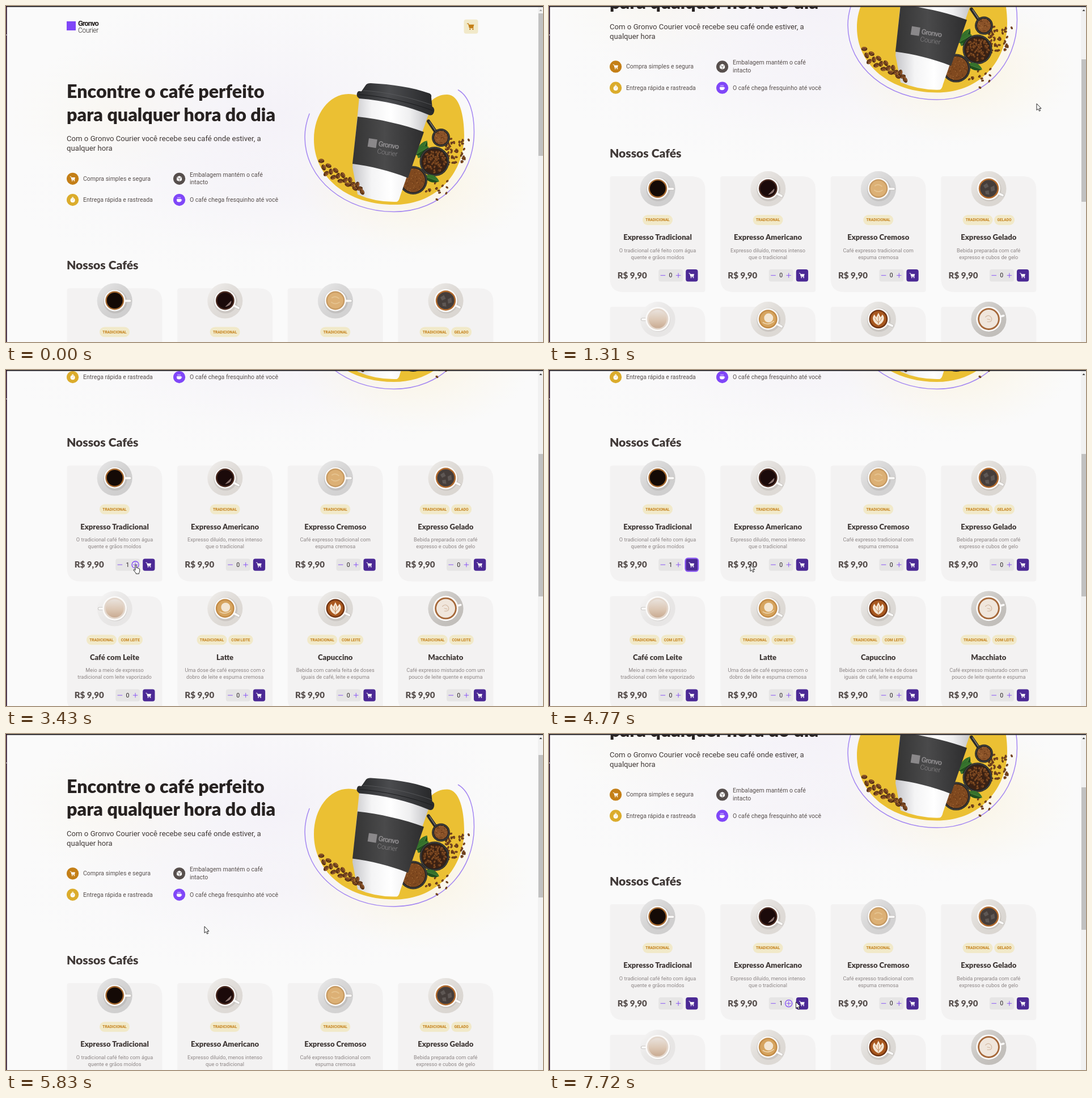
These frames come from a looping animation (947x592 px, 7.99 s). An HTML page:

```html
<!DOCTYPE html>
<html lang="pt-BR">
<head>
<meta charset="utf-8">
<title>Loja de cafés</title>
<style>
html, body { margin: 0; width: 100%; height: 100%; overflow: hidden; background: #fafafa; }
svg { display: block; width: 947px; height: 592px; font-family: Roboto, sans-serif; }
.head { font-family: Lato, sans-serif; font-weight: 900; }
.mid { text-anchor: middle; }
.h1 { font-size: 32.2px; fill: #272221; }
.h2 { font-size: 21.1px; fill: #403937; }
.lead { font-size: 13.16px; fill: #403937; }
.item { font-size: 10.53px; fill: #574f4d; }
.name { font-size: 13.1px; fill: #403937; }
.desc { font-size: 9.21px; fill: #8d8686; }
.price { font-size: 15.1px; fill: #574f4d; }
.count { font-size: 10.53px; fill: #272221; }
.tag { font-size: 6.58px; font-weight: 700; fill: #c47f17; }
.badge { font-size: 8px; fill: #fff; }
.brand { font-size: 13px; font-weight: 700; letter-spacing: -1px; }
.sub { font-size: 12px; font-weight: 300; letter-spacing: -.3px; }
</style>
</head>
<body>
<svg id="stage" viewBox="0 0 947 592"></svg>
<script>
const text = (x, y, str, cls, extra = '') => `<text x="${x}" y="${y}" class="${cls}" ${extra}>${str}</text>`;
const rect = (x, y, w, h, fill, r = 0) => `<rect x="${x}" y="${y}" width="${w}" height="${h}" rx="${r}" fill="${fill}"/>`;
const circle = (x, y, r, fill, extra = '') => `<circle cx="${x}" cy="${y}" r="${r}" fill="${fill}" ${extra}/>`;
const path = (d, fill, extra = '') => `<path d="${d}" fill="${fill}" ${extra}/>`;
const line = (d, color, width) => path(d, 'none', `stroke="${color}" stroke-width="${width}" stroke-linecap="round"`);
const at = (x, y, body, more = '') => `<g transform="translate(${x} ${y}) ${more}">${body}</g>`;

let seed = 7;
const random = () => (seed = seed * 16807 % 2147483647) / 2147483647;

const defs = `<defs>
  <radialGradient id="lilac"><stop offset="0" stop-color="#ece6f5" stop-opacity=".42"/><stop offset="1" stop-color="#f1edf8" stop-opacity="0"/></radialGradient>
  <radialGradient id="cream"><stop offset="0" stop-color="#fbf0d0" stop-opacity=".6"/><stop offset="1" stop-color="#fdf6de" stop-opacity="0"/></radialGradient>
  <linearGradient id="paper"><stop offset="0" stop-color="#c6c6ca"/><stop offset=".25" stop-color="#f4f4f5"/><stop offset=".5" stop-color="#fff"/><stop offset=".75" stop-color="#efeff0"/><stop offset="1" stop-color="#c2c2c5"/></linearGradient>
  <linearGradient id="sleeve"><stop offset="0" stop-color="#343434"/><stop offset=".45" stop-color="#4a4a4b"/><stop offset="1" stop-color="#2d2d2e"/></linearGradient>
  <linearGradient id="lid"><stop offset="0" stop-color="#2a2b2d"/><stop offset=".4" stop-color="#4b4c4f"/><stop offset="1" stop-color="#27282a"/></linearGradient>
  <linearGradient id="china" x2="1" y2="1"><stop offset="0" stop-color="#fff" stop-opacity=".5"/><stop offset="1" stop-color="#8d8884" stop-opacity=".12"/></linearGradient>
  <linearGradient id="milk" x2="0" y2="1"><stop offset="0" stop-color="#e9e2dc"/><stop offset=".55" stop-color="#dcc7b4"/><stop offset="1" stop-color="#c9ab92"/></linearGradient>
</defs>`;

const cart = (x, y, color, k = 1) => at(x, y,
  line('M-5-4h1.7l1.7 6.2h5.4', color, 1) + path('M-3.2-2.6H4.9L3.6 1.8H-2z', color) +
  circle(-1, 4, 1, color) + circle(3.2, 4, 1, color), `scale(${k})`);

const bean = (x, y, angle, k = 1) => at(x, y,
  `<ellipse rx="6.2" ry="4.3" fill="#5a3216"/><ellipse cx="-.5" cy="-.8" rx="4.9" ry="2.8" fill="#94592c"/>` +
  line('M-5 .6Q0-1.4 5 .6', '#351c0c', 1), `rotate(${angle}) scale(${k})`);

function scatter(n, place) {
  let out = '';
  for (let i = 0; i < n; i++) out += bean(...place(i));
  return out;
}

function bowl(x, y, r, fill, beans) {
  const inside = scatter(beans, () => {
    const a = random() * 6.283, d = Math.sqrt(random()) * (r - 6);
    return [x + Math.cos(a) * d, y + Math.sin(a) * d, random() * 180, .42];
  });
  return circle(x, y, r, '#252423') + circle(x, y, r - 1.6, 'none', 'stroke="#62605e" stroke-width=".8"') +
    circle(x, y, r - 4, fill) + inside;
}

function grounds(x, y, r) {
  let out = '';
  for (let i = 0; i < r * 4; i++) {
    const a = random() * 6.283, d = Math.sqrt(random()) * r;
    out += circle((x + Math.cos(a) * d).toFixed(1), (y + Math.sin(a) * d).toFixed(1), .8, i % 2 ? '#a66c38' : '#633616');
  }
  return out;
}

function leaf(x, y, angle, k) {
  return at(x, y, path('M0 0C8-12 24-13 34-3C24 7 9 9 0 0z', '#1f4f1e') +
    path('M0 0C8-12 24-13 34-3z', '#35722c') + line('M1 0L33-3', '#70a04f', .6), `rotate(${angle}) scale(${k})`);
}

function illustration() {
  const blob = 'M543 235C543 190 570 155 604 155C655 156 665 205 700 205C738 205 738 156 778 156C800 156 808 194 808 228C808 292 762 350 684 350C602 350 543 302 543 235z';
  const arc = 'M535 190C530 203 527 216 527 231C527 305 598 362.500 684 362.500C768 362.500 825.500 300 825.500 222C825.500 190 818 160 797.500 148';
  const spill = scatter(56, () => {
    const u = random(), v = random();
    return [776 + u * u * 36, 234 + v * 46, random() * 180, .42];
  }) + scatter(14, () => [738 + random() * 42, 308 + random() * 24, random() * 180, .4]) +
    bean(760, 341, 30, .42) + bean(816, 236, 60, .42) + bean(808, 267, 20, .42);
  const pile = scatter(18, i => {
    const u = i / 17;
    return [556 + u * 72, 282 + u * 42 + (i % 3 - 1) * 9 * (1 - u * .6), i * 67 % 180, .86];
  });
  const mark = at(640, 233, rect(0, 0, 15, 15, '#8a888a') +
    text(18, 11, 'Gronvo', 'brand', 'fill="#8a888a"') + text(18, 24, 'Courier', 'sub', 'fill="#8a888a"'), 'rotate(9)');
  return path(blob, '#ebc033') + line(arc, '#a487f2', 1.5) +
    leaf(727, 268, -58, 1) + leaf(722, 262, -25, .8) +
    line('M745 203L758 222', '#2a2928', 6) + line('M747 204L757 219', '#8c8b89', 1.2) +
    spill + bowl(767, 232, 16, '#8a5228', 0) + grounds(767, 232, 12) +
    bowl(755.5, 274, 26, '#3a2114', 75) + leaf(738, 300, 25, .8) +
    bowl(718, 307, 25, '#80491f', 0) + grounds(718, 307, 20) +
    path('M623 160L611 284L620 332Q652 346 689 345Q693 344 695 335L746 188z', 'url(#paper)') +
    path('M620 195C658 199 702 209 737 222L709 303C676 290 643 282 611 278z', 'url(#sleeve)') +
    path('M634 140Q636 136 643 136C681 138 716 143 747 154Q751 156 750 161L752 181L625 153z', 'url(#lid)') +
    path('M623 150C666 153 715 164 753 178Q757 182 754 189Q751 194 746 192C710 177 666 166 623 163Q617 159 619 154Q620 150 623 150z', 'url(#lid)') +
    line('M623 156C666 159 714 170 752 184', '#1b1c1e', 1) + line('M630 149C668 151 713 161 750 174', '#5c5d60', .8) +
    mark + pile;
}

function feature(x, y, color, icon, lines) {
  const first = y + 3.4 - (lines.length - 1) * 7;
  return circle(x, y, 10.6, color) + at(x, y, icon) +
    lines.map((s, i) => text(x + 18.4, first + i * 13.7, s, 'item')).join('');
}

function hero() {
  const timer = circle(0, .7, 4, '#fff') + rect(-1.5, -5, 3, 1.2, '#fff') + line('M0 .7L1.6-1', '#dbac2c', .8);
  const box = path('M0-5L4.500-2.600V2.600L0 5L-4.500 2.600V-2.600z', '#fff') + line('M-4-2.400L0-.2L4-2.400M0 0V4.500', '#574f4d', .8);
  const mug = path('M-4.500-1.500H3.500V1.500Q3 4-.5 4Q-4 4-4.500 1.500z', '#fff') + line('M3.600-.6Q5.600-.6 3.400 2M-2.500-4.500V-3M-.5-4.500V-3M1.500-4.500V-3', '#fff', .8);
  return `<ellipse cx="470" cy="190" rx="420" ry="240" fill="url(#lilac)"/>
    <ellipse cx="470" cy="330" rx="460" ry="150" fill="url(#lilac)" opacity=".5"/>
    <ellipse cx="720" cy="310" rx="210" ry="130" fill="url(#cream)"/>
    <ellipse cx="190" cy="190" rx="190" ry="120" fill="url(#cream)" opacity=".3"/>` +
    rect(107, 27, 16, 16, '#8047f8') +
    text(127, 34.5, 'Gronvo', 'brand', 'fill="#272221"') + text(127, 47, 'Courier', 'sub', 'fill="#272221"') +
    rect(807.5, 23.7, 25, 25, '#f1e9c9', 4) + cart(819.5, 36, '#c47f17', 1.22) +
    `<g id="badge">${circle(831, 25, 6.6, '#c47f17')}${text(831, 27.9, '1', 'badge mid')}</g>` +
    text(107, 162, 'Encontre o café perfeito', 'head h1') + text(107, 202.5, 'para qualquer hora do dia', 'head h1') +
    text(107, 238, 'Com o Gronvo Courier você recebe seu café onde estiver, a', 'lead') + text(107, 255, 'qualquer hora', 'lead') +
    feature(117.6, 304.3, '#c47f17', cart(0, 0, '#fff', .9), ['Compra simples e segura']) +
    feature(117.6, 341.6, '#dbac2c', timer, ['Entrega rápida e rastreada']) +
    feature(305.6, 304.3, '#574f4d', box, ['Embalagem mantém o café', 'intacto']) +
    feature(305.6, 341.6, '#8047f8', mug, ['O café chega fresquinho até você']) +
    illustration() + text(107, 464, 'Nossos Cafés', 'head h2');
}

const CHILL = ['TRADICIONAL', 'GELADO'], MILKY = ['TRADICIONAL', 'COM LEITE'], PLAIN = ['TRADICIONAL'];
const TAG_WIDTH = { TRADICIONAL: 53, GELADO: 36, 'COM LEITE': 43.5 };

// look: saucer, rim, coffee, handle angle, surface drawing, cup scale
const drinks = [
  { name: 'Expresso Tradicional', desc: ['O tradicional café feito com água', 'quente e grãos moídos'], tags: PLAIN,
    look: ['#dadadb', '#a5682f', '#140a06', 0, ''] },
  { name: 'Expresso Americano', desc: ['Expresso diluído, menos intenso', 'que o tradicional'], tags: PLAIN,
    look: ['#ece8e4', '#4a2a20', '#1b0a0a', 28, path('M0 11L11 0Q12 9 0 11z', '#8c7470')] },
  { name: 'Expresso Cremoso', desc: ['Café expresso tradicional com', 'espuma cremosa'], tags: PLAIN,
    look: ['#dededf', '#c79a62', '#dcb075', 0, line('M-6-5Q0-9 6-4M-7 3Q0 8 7 3', '#e5c28e', 2)] },
  { name: 'Expresso Gelado', desc: ['Bebida preparada com café', 'expresso e cubos de gelo'], tags: CHILL,
    look: ['#e8e4df', '#b0692c', '#453d3a', 25, path('M-9-5L-3-9L0-3L-6 0zM3-2L9-5L10 3L4 5zM-6 4L0 3L1 10L-5 9z', '#5e5754'), 1.08] },
  { name: 'Café com Leite', desc: ['Meio a meio de expresso', 'tradicional com leite vaporizado'], tags: MILKY,
    look: ['#f8f7f7', '#e3d6cb', 'url(#milk)', 180, '', 1.14] },
  { name: 'Latte', desc: ['Uma dose de café expresso com o', 'dobro de leite e espuma cremosa'], tags: MILKY,
    look: ['#ebe7e2', '#c28a45', '#d6a45f', 28, circle(1, -2, 8, '#f3e6d3') + line('M-9 6Q0 12 10 4', '#efd9b5', 1.5)] },
  { name: 'Capuccino', desc: ['Bebida com canela feita de doses', 'iguais de café, leite e espuma'], tags: MILKY,
    look: ['#e9e6e2', '#6f3413', '#a8581f', 25, path('M0 11C-9 7-13-2-7-8L-4-3L0-11L4-3L7-8C13-2 9 7 0 11z', '#f5e6d3') + line('M0-5V9M-6-2Q-4 4 0 6Q4 4 6-2', '#b56e38', .8)] },
  { name: 'Macchiato', desc: ['Café expresso misturado com um', 'pouco de leite quente e espuma'], tags: MILKY,
    look: ['#c9c6c2', '#a5683a', '#f0e6dc', -14, line('M-5-3Q0-8 4-2Q6 5-2 4M-2 0L2 1', '#d4bba5', 1), 1.18] }
];

function coffee([saucer, rim, fill, angle, surface, size = 1]) {
  const handle = at(0, 0, line('M17 0H27', '#bfbcb9', 5.4) + line('M17 0H27', '#faf9f8', 3.8), `rotate(${angle})`);
  const cup = circle(0, 0, 18.8, '#fbfaf9') + circle(0, 0, 16.4, rim) + circle(0, 0, 14, fill) + surface;
  return circle(0, 0, 31, saucer) + circle(0, 0, 31, 'url(#china)') + circle(1, 1, 21, '#5c5550', 'opacity=".14"') +
    handle + at(0, -.5, cup, `scale(${size})`);
}

function tagRow(tags) {
  const gap = 2.6, total = tags.reduce((w, tag) => w + TAG_WIDTH[tag], gap * (tags.length - 1));
  let x = 84 - total / 2;
  return tags.map(tag => {
    const w = TAG_WIDTH[tag], out = rect(x, 68, w, 17.8, '#f1e9c9', 8.9) + text(x + w / 2, 79.2, tag, 'tag mid');
    x += w + gap;
    return out;
  }).join('');
}

function card(drink, i) {
  const shape = 'M4 0H144Q168 0 168 24V200Q168 204 164 204H24Q0 204 0 180V4Q0 0 4 0z';
  return at(107.5 + i % 4 * 194.600, 497.5 + (i >> 2) * 230,
    path(shape, '#f3f2f2') + at(84.2, 22, coffee(drink.look)) + tagRow(drink.tags) +
    text(84, 112, drink.name, 'head name mid') +
    drink.desc.map((s, n) => text(84, 133.7 + n * 12, s, 'desc mid')).join('') +
    text(13.2, 179.5, 'R$ 9,90', 'head price') +
    rect(85.7, 164, 43, 21.300, '#e6e5e5', 4) +
    line('M89.500 174.600H97.300M116.800 174.600H124.400M120.600 170.800V178.400', '#8047f8', .9) +
    text(107, 178.3, '0', 'count mid', `id="count${i}"`) +
    circle(120.6, 174.6, 6.1, 'none', `id="plus${i}" stroke="#8047f8" stroke-width="1.3"`) +
    rect(133.7, 164, 21.300, 21.300, '#4b2995', 4) + cart(144, 174.6, '#fff', .95) +
    `<rect id="cart${i}" x="132.900" y="163.200" width="22.900" height="22.900" rx="4.500" fill="none" stroke="#8047f8" stroke-width="1.8"/>`);
}

const pointer = path('M0 0V11.5L2.700 9.200L4.600 13.200L6.500 12.300L4.700 8.400H8z', '#fff', 'stroke="#111" stroke-width=".9" stroke-linejoin="round"');
const hand = path('M3.500 10V1.500Q3.500 .3 4.600 .3T5.700 1.500V5.500Q7.500 5 7.800 6.300Q9.300 5.800 9.600 7Q11.200 6.800 11.200 8.300V11.500Q10.900 13.500 10 14.500V16H4.600V14.700L.6 9.900Q.2 8.500 1.600 8.500z', '#fff', 'stroke="#111" stroke-width=".9" stroke-linejoin="round"');

const stage = document.getElementById('stage');
stage.innerHTML = defs + rect(0, 0, 947, 592, '#fafafa') +
  `<g id="page">${hero()}${drinks.map(card).join('')}</g>` +
  rect(938, 0, 9, 592, '#f1f1f1') + path('M940.500 9H945.500L943 6z', '#505050', 'id="up"') +
  `<g id="thumb">${rect(939, 13, 8, 251, '#c1c1c1')}</g>` +
  rect(0, 0, 947, 1.8, '#2b292d') + rect(0, 0, 1.6, 592, '#280d27') + rect(0, 50, 1.5, 2, '#b9adb8') +
  `<g id="pointer">${pointer}</g><g id="hand">${hand}</g>`;

const $ = id => document.getElementById(id);
const show = (id, on) => $(id).setAttribute('visibility', on ? 'visible' : 'hidden');
const move = (id, x, y) => $(id).setAttribute('transform', `translate(${x} ${y})`);

// time, scroll, cursor x, cursor y, cursor kind
const steps = [
  [0, 0, 0, 0, ''],
  [250, 0, 845, 279, 'pointer'],
  [510, 0, 858, 174, 'pointer'],
  [780, 0, 860, 172, 'pointer'],
  [1050, 28.2, 860, 172, 'pointer'],
  [1310, 197.4, 860, 172, 'pointer'],
  [1840, 307, 860, 172, 'pointer'],
  [2100, 329, 427, 373, 'pointer'],
  [2370, 329, 290, 357, 'pointer'],
  [2630, 329, 226, 344, 'hand'],
  [2900, 329, 224.5, 343, 'hand'],
  [3980, 329, 228, 343, 'hand'],
  [4250, 329, 247, 342, 'hand'],
  [4770, 329, 355, 343, 'pointer'],
  [5040, 197.4, 366, 329.5, 'pointer'],
  [5300, 0, 366, 329.5, 'pointer'],
  [5830, 58.5, 350, 339, 'pointer'],
  [6110, 197.4, 350, 339, 'pointer'],
  [6380, 197.4, 386, 405, 'pointer'],
  [6640, 197.4, 431, 479, 'pointer'],
  [6910, 197.4, 427.5, 495, 'pointer'],
  [7180, 197.4, 423.5, 481, 'pointer'],
  [7450, 197.4, 418, 477, 'hand'],
  [7720, 197.4, 435.5, 472, 'pointer']
];
const LOOP = 7990, ADD_FIRST = 3170, TO_CART = 4510, ADD_SECOND = 7720;

function render(t) {
  const [, scroll, x, y, kind] = steps.findLast(step => step[0] <= t);
  move('page', 0, -scroll);
  move('thumb', 0, scroll * .41);
  $('up').setAttribute('fill', scroll ? '#404040' : '#a3a3a3');
  for (const id of ['pointer', 'hand']) {
    show(id, id === kind);
    move(id, x, y);
  }
  const focus = t >= ADD_SECOND ? 'plus1' : t >= TO_CART ? 'cart0' : t >= ADD_FIRST ? 'plus0' : '';
  drinks.forEach((_, i) => {
    show('plus' + i, focus === 'plus' + i);
    show('cart' + i, focus === 'cart' + i);
  });
  $('count0').textContent = t >= ADD_FIRST ? 1 : 0;
  $('count1').textContent = t >= ADD_SECOND ? 1 : 0;
  show('badge', t >= TO_CART);
}

const start = performance.now();
function tick() {
  render((performance.now() - start) % LOOP);
  requestAnimationFrame(tick);
}
tick();
</script>
</body>
</html>
```
